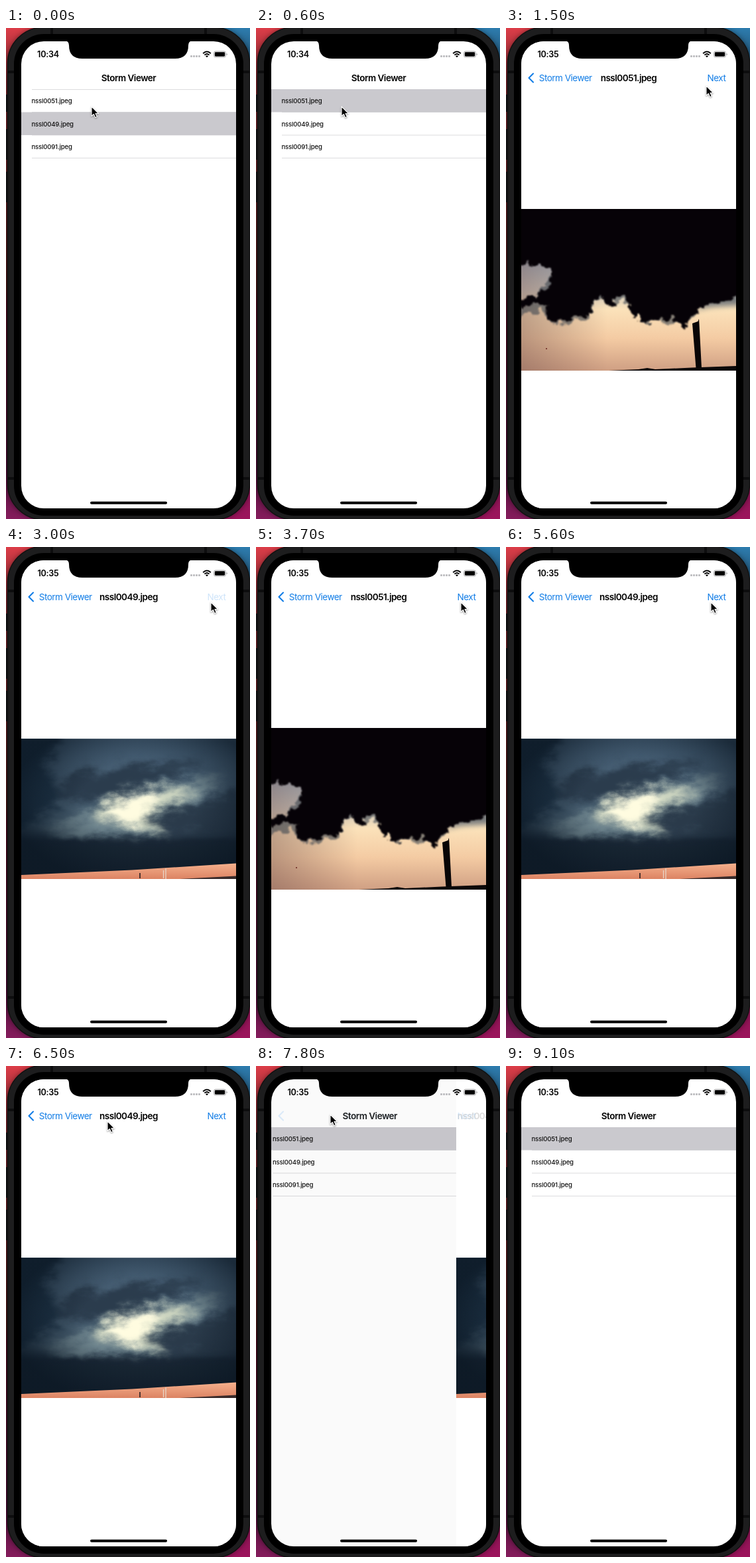
Write an HTML page that moves like this. It is 368 by 738 pixels and loops after 9700 ms.

```html
<!DOCTYPE html>
<html lang="en">
<head>
<meta charset="utf-8">
<title>Storm Viewer</title>
<style>
  html, body { margin: 0; width: 100%; height: 100%; overflow: hidden; background: #000; }
  svg { display: block; width: 368px; height: 738px; }
  text { font-family: Inter, "Liberation Sans", Arial, sans-serif; }
  filter { color-interpolation-filters: sRGB; }
  .bar { font-size: 13.5px; letter-spacing: -.037em; text-anchor: middle; }
  .bold { font-weight: 600; }
  .blue { fill: #127de6; }
  .row { font-size: 9.6px; font-weight: 500; letter-spacing: -.02em; fill: #111; }
  .clock { font-size: 12.6px; font-weight: 600; letter-spacing: -.02em; text-anchor: middle; }
</style>
</head>
<body>
<svg viewBox="0 0 368 738">
  <defs>
    <linearGradient id="wallLeft" x1="0" y1="0" x2="0" y2="1">
      <stop offset="0" stop-color="#dc3d48"/><stop offset=".1" stop-color="#7c2830"/>
      <stop offset=".53" stop-color="#4a1a1a"/><stop offset=".56" stop-color="#4d0c20"/>
      <stop offset=".9" stop-color="#4e1038"/><stop offset="1" stop-color="#851c5c"/>
    </linearGradient>
    <linearGradient id="wallRight" x1="0" y1="0" x2="0" y2="1">
      <stop offset="0" stop-color="#2d7cae"/><stop offset=".1" stop-color="#1c3c55"/>
      <stop offset=".6" stop-color="#3a1528"/><stop offset="1" stop-color="#9c145c"/>
    </linearGradient>
    <linearGradient id="dusk" x1="0" y1="0" x2="0" y2="1">
      <stop offset=".32" stop-color="#9fadb9"/><stop offset=".5" stop-color="#cfcabf"/>
      <stop offset=".62" stop-color="#fbe2ba"/><stop offset=".8" stop-color="#f4cba3"/>
      <stop offset="1" stop-color="#cf9f83"/>
    </linearGradient>
    <linearGradient id="leftShade">
      <stop offset="0" stop-color="#6b4a48" stop-opacity=".42"/><stop offset=".4" stop-color="#6b4a48" stop-opacity="0"/>
    </linearGradient>
    <linearGradient id="gloom" x1="0" y1="0" x2="0" y2="1">
      <stop offset="0" stop-color="#4d6880"/><stop offset=".35" stop-color="#43596c"/>
      <stop offset=".62" stop-color="#43596a"/><stop offset=".73" stop-color="#1d2b3a"/>
      <stop offset="1" stop-color="#18232f"/>
    </linearGradient>
    <linearGradient id="field" x1="0" y1="0" x2="0" y2="1">
      <stop offset="0" stop-color="#f5b08c"/><stop offset="1" stop-color="#dc8363"/>
    </linearGradient>
    <radialGradient id="vignette" cx=".55" cy=".45" r=".6">
      <stop offset=".45" stop-color="#0a1622" stop-opacity="0"/><stop offset="1" stop-color="#0a1622" stop-opacity=".75"/>
    </radialGradient>
    <filter id="ragged" x="-10%" y="-10%" width="120%" height="120%">
      <feTurbulence type="fractalNoise" baseFrequency=".08" numOctaves="4" seed="4"/>
      <feDisplacementMap in="SourceGraphic" scale="20" xChannelSelector="R" yChannelSelector="G"/>
      <feGaussianBlur stdDeviation="1"/>
    </filter>
    <filter id="wispy" x="-30%" y="-30%" width="160%" height="160%">
      <feGaussianBlur in="SourceGraphic" stdDeviation="7" result="soft"/>
      <feTurbulence type="fractalNoise" baseFrequency=".03 .05" numOctaves="4" seed="9" result="noise"/>
      <feDisplacementMap in="soft" in2="noise" scale="32" xChannelSelector="R" yChannelSelector="G"/>
    </filter>
    <filter id="blur" x="-30%" y="-30%" width="160%" height="160%"><feGaussianBlur stdDeviation="4"/></filter>
    <filter id="shade" x="-50%" y="-50%" width="200%" height="200%">
      <feDropShadow dx="0" dy="1" stdDeviation=".8" flood-opacity=".4"/>
    </filter>
    <clipPath id="glass"><rect x="23" y="20" width="324" height="702" rx="34"/></clipPath>
    <clipPath id="frameA"><rect x="23" y="272" width="324" height="243"/></clipPath>
    <clipPath id="frameB"><rect x="23" y="288.300" width="324" height="210.700"/></clipPath>
  </defs>

  <!-- wallpaper and phone body -->
  <rect width="184" height="738" fill="url(#wallLeft)"/>
  <rect x="184" width="184" height="738" fill="url(#wallRight)"/>
  <g fill="#17171a">
    <rect y="100" width="4" height="26"/><rect y="152" width="4" height="46"/>
    <rect y="216" width="4" height="46"/><rect x="366" y="168" width="2" height="74"/>
  </g>
  <rect x="2.500" y="-1" width="365" height="740" rx="54" opacity=".5" filter="url(#blur)"/>
  <rect x="2.500" y="-1" width="365" height="740" rx="54" fill="#1d1d1e" stroke="#111" stroke-width="1.500"/>
  <g fill="#0d0d0e">
    <rect x="3" y="64" width="9" height="4"/><rect x="3" y="675" width="9" height="4"/>
    <rect x="358" y="64" width="10" height="4"/><rect x="358" y="675" width="10" height="4"/>
    <rect x="67" y="0" width="4" height="9"/><rect x="299" y="0" width="4" height="9"/>
  </g>
  <rect x="12" y="9" width="346" height="724" rx="45"/>

  <g clip-path="url(#glass)">
    <rect x="23" y="20" width="324" height="702" fill="#fff"/>
    <g id="list"></g>
    <rect id="dim" x="23" y="20" width="324" height="702"/>

    <g id="detail">
      <rect x="23" y="20" width="324" height="702" fill="#fff"/>
      <g id="photo51" clip-path="url(#frameA)">
        <rect x="23" y="272" width="324" height="243" fill="url(#dusk)"/>
        <rect x="23" y="272" width="324" height="243" fill="url(#leftShade)"/>
        <path d="M285 424L305 408L360 396V416L310 419Z" fill="#5d646c" opacity=".8" filter="url(#blur)"/>
        <path d="M15 426L45 400L72 372L110 390H190L196 424L240 432L285 424L285 436L262 446L205 440L180 410L158 412L134 408L125 438L72 446L52 424L15 436Z" fill="#3d4650" opacity=".6" filter="url(#ragged)"/>
        <path d="M10 250V354L46 356L70 361L73 377L60 393L42 401L10 411V426L42 414L62 419L60 437L74 443L100 437L126 432L132 410L144 402L150 415L158 417L170 404L182 405L187 424L202 437L225 442L249 434L262 446L275 449L280 432L300 418L325 411L360 400V250Z" fill="#060207" filter="url(#ragged)"/>
        <path d="M281 444L289.500 441L291 437L291.500 445L295 511H286.500Z" fill="#080506"/>
        <path d="M155 515L200 513L213 511L225 513L280 510.500L347 508V515Z" fill="#0b0708"/>
        <circle cx="61" cy="482" r="1" fill="#64201c"/>
      </g>
      <g id="photo49" clip-path="url(#frameB)">
        <rect x="23" y="288" width="324" height="211" fill="url(#gloom)"/>
        <g filter="url(#wispy)">
          <path d="M0 270H90L60 330L90 380L0 440Z" fill="#1f3447"/>
          <path d="M90 342L200 326L300 326L220 356L130 382L70 378Z" fill="#2b3c4d"/>
          <path d="M55 428L130 398L160 374L250 354L330 342L312 364L265 398L228 434L120 436Z" fill="#6d838c"/>
          <path d="M130 402L165 375L215 368L290 358L265 382L218 400L240 430L190 424Z" fill="#cfd7c1"/>
          <path d="M146 400L176 374L238 368L218 391L206 420L170 414Z" fill="#fffce0"/>
          <path d="M370 362L275 390L212 408L245 430L370 438Z" fill="#2a3a4a"/>
        </g>
        <path d="M15 443L130 440L230 443L355 437V500H15Z" fill="#1a2735" opacity=".9" filter="url(#blur)"/>
        <rect x="23" y="288" width="324" height="211" fill="url(#vignette)"/>
        <path d="M23 493L190 485.500L347 475.500V499H23Z" fill="url(#field)"/>
        <path d="M262 499L300 497L347 494.500V499Z" fill="#382a2a"/>
        <path d="M202 490V498" stroke="#4b3430" stroke-width="2"/>
        <path d="M237.500 486V498M241 483V499" stroke="#e8d6c8" stroke-width="1.300"/>
      </g>
    </g>

    <!-- navigation bar -->
    <path id="chevron" d="M41 68.500L34.500 75L41 81.500" fill="none" stroke="#127de6" stroke-width="2.100" stroke-linecap="round" stroke-linejoin="round"/>
    <text id="back" class="bar blue" y="79.700">Storm Viewer</text>
    <text id="home" class="bar bold" y="79.700">Storm Viewer</text>
    <text id="title" class="bar bold" y="79.700"></text>
    <text id="next" class="bar blue" x="317.500" y="79.700">Next</text>

    <!-- status bar -->
    <text id="clock" class="clock" x="63.500" y="44.200"></text>
    <g fill="#bdbdc0">
      <rect x="278" y="41" width="3" height="3" rx="1"/><rect x="282" y="41" width="3" height="3" rx="1"/>
      <rect x="286" y="41" width="3" height="3" rx="1"/><rect x="290" y="41" width="3" height="3" rx="1"/>
    </g>
    <g fill="none" stroke="#000" stroke-width="1.900">
      <path d="M297.200 38.200Q303 32.800 308.800 38.200"/><path d="M299.400 40.600Q303 37.200 306.600 40.600"/>
    </g>
    <path d="M301 42.200Q303 40.500 305 42.200L303 44.300Z"/>
    <rect x="313.500" y="35" width="18" height="9" rx="2.600" fill="none" stroke="#a5a5a8" stroke-width=".9"/>
    <rect x="314.800" y="36.300" width="15.400" height="6.400" rx="1.400"/>
    <path d="M332.700 38V41Q334 40.500 334 39.500T332.700 38Z" fill="#a5a5a8"/>
    <rect x="127" y="711.800" width="116" height="4" rx="2"/>
  </g>
  <path d="M89 19Q95 20 95 26Q95 46 115 46H255Q275 46 275 26Q275 20 281 19Z"/>

  <path id="cursor" d="M0 0V14.500L3.400 11.500L5.700 16.700L8.300 15.600L6 10.500H10.500Z" stroke="#fff" stroke-width="1.100" stroke-linejoin="round" filter="url(#shade)"/>
</svg>

<script>
const $ = id => document.getElementById(id);
const LOOP = 9700, LAST = 9100, STEP = 100;
const SELECT = 500, PUSH = 600, POP = 7500;
const WIDTH = 324, PARALLAX = 97, SPRING = 11.57;
const TITLE_X = 185, BACK_X = 89.7;

const shots = [[0, '51'], [2100, '49'], [3100, '51'], [5100, '49']];
const presses = [[1900, 2100], [2900, 3100], [4900, 5100]];
const pointer = [
  [0, 129, 118], [700, 129, 118], [1500, 302, 87], [1900, 309, 83], [5700, 309, 83],
  [6500, 153, 83], [7200, 112, 73], [8100, 112, 73], [8700, 180, -20]
];

const line = y => `<path d="M39 ${y}H347" stroke="#dcdcde"/>`;
const files = ['51', '49', '91'];
$('list').innerHTML = [92.5, 126.5, 161, 195.5].map(line).join('') +
  '<rect id="picked" x="23" width="420" height="34.500" fill="#cac9ce"/>' +
  files.map((n, i) => `<text class="row" x="38.500" y="${113.2 + 34.4 * i}">nssl00${n}.jpeg</text>`).join('');

const set = (id, attrs) => {
  for (const key in attrs) $(id).setAttribute(key, attrs[key]);
};
const shift = (id, x, y = 0) => set(id, { transform: `translate(${x} ${y})` });

// critically damped rise from 0 to 1
function spring(ms) {
  if (ms <= 0) return 0;
  if (ms >= 700) return 1;
  const k = SPRING * ms / 1000;
  return 1 - (1 + k) * Math.exp(-k);
}

function pointerAt(t) {
  const i = pointer.findIndex(p => p[0] > t);
  if (i < 0) return null;
  const [t0, x0, y0] = pointer[i - 1], [t1, x1, y1] = pointer[i];
  const u = (t - t0) / (t1 - t0), e = u * u * (3 - 2 * u);
  return [x0 + (x1 - x0) * e, y0 + (y1 - y0) * e];
}

function draw(t) {
  const p = spring(t - PUSH) - spring(t - POP);
  const shot = shots.filter(s => s[0] <= t).pop()[1];
  const pressed = presses.some(([a, b]) => t >= a && t < b);
  const backHeld = t >= POP - 200 && t < POP;

  shift('list', -PARALLAX * p);
  shift('detail', WIDTH * (1 - p));
  set('dim', { opacity: .13 * p });
  set('picked', { y: t < SELECT ? 126.5 : 92 });
  set('photo51', { display: shot === '51' ? 'inline' : 'none' });
  set('photo49', { display: shot === '49' ? 'inline' : 'none' });

  const labelX = TITLE_X + (BACK_X - TITLE_X) * p;
  set('home', { x: labelX, opacity: 1 - p });
  set('back', { x: labelX, opacity: p * (backHeld ? .2 : 1) });
  set('chevron', { opacity: p * (backHeld ? .2 : 1) });
  set('title', { x: TITLE_X + 189 * (1 - p), opacity: p });
  set('next', { opacity: p * (pressed ? .2 : 1) });
  $('title').textContent = `nssl00${shot}.jpeg`;
  $('clock').textContent = t < 800 ? '10:34' : '10:35';

  const at = pointerAt(t);
  set('cursor', { display: at ? 'inline' : 'none' });
  if (at) shift('cursor', ...at);
}

const start = performance.now();
let shown = -1;
function tick() {
  const t = (performance.now() - start) % LOOP;
  const q = t < 200 ? 0 : Math.min(LAST, Math.floor(t / STEP) * STEP);
  if (q !== shown) draw(shown = q);
  requestAnimationFrame(tick);
}
tick();
</script>
</body>
</html>
```
